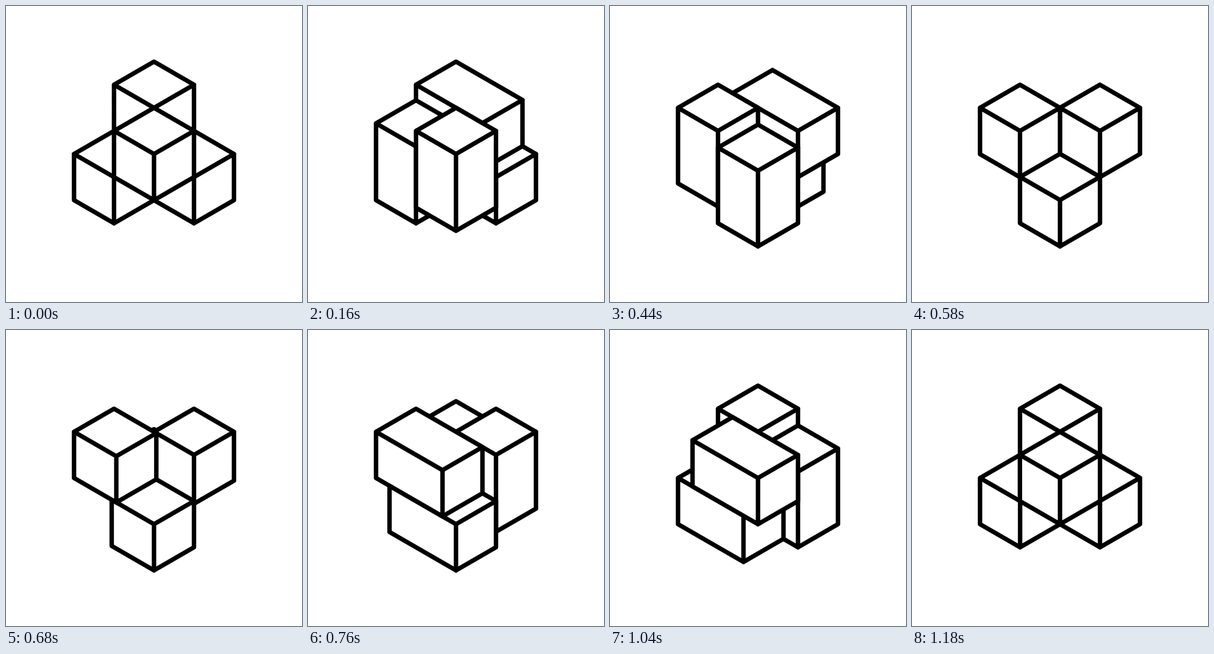
Write an HTML page without scripts that moves like this. It is 500 by 500 pixels and loops after 1.2 s.

```html
<!DOCTYPE html>
<html lang="en">
<head>
<meta charset="utf-8">
<title>Sliding boxes</title>
<style>
  html, body { margin: 0; width: 100%; height: 100%; overflow: hidden; background: #fff; }
  svg { display: block; width: 500px; height: 500px; }

  path {
    fill: #fff;
    stroke: #000;
    stroke-width: 7.5px;
    stroke-linejoin: round;
    vector-effect: non-scaling-stroke;
    animation: 600ms cubic-bezier(.8, 0, .2, 1) infinite;
  }

  /* Each box stretches one unit along its axis, then pulls in its tail. */
  .forward { animation-name: forward; }
  .back { animation-name: back; }
  .up { animation-name: up; }
  .down { animation-name: down; }

  @keyframes forward {
    0%   { d: path("M0 0 l-1 -1 l1 -1 l1 1 z l-1 -1 v2 l1 1 z l1 -1 v2 l-1 1 z"); }
    50%  { d: path("M1 1 l-2 -2 l1 -1 l2 2 z l-2 -2 v2 l2 2 z l1 -1 v2 l-1 1 z"); }
    100% { d: path("M1 1 l-1 -1 l1 -1 l1 1 z l-1 -1 v2 l1 1 z l1 -1 v2 l-1 1 z"); }
  }
  @keyframes back {
    0%   { d: path("M0 0 l-1 -1 l1 -1 l1 1 z l-1 -1 v2 l1 1 z l1 -1 v2 l-1 1 z"); }
    50%  { d: path("M0 0 l-2 -2 l1 -1 l2 2 z l-2 -2 v2 l2 2 z l1 -1 v2 l-1 1 z"); }
    100% { d: path("M-1 -1 l-1 -1 l1 -1 l1 1 z l-1 -1 v2 l1 1 z l1 -1 v2 l-1 1 z"); }
  }
  @keyframes up {
    0%   { d: path("M0 0 l-1 -1 l1 -1 l1 1 z l-1 -1 v2 l1 1 z l1 -1 v2 l-1 1 z"); }
    50%  { d: path("M0 -2 l-1 -1 l1 -1 l1 1 z l-1 -1 v4 l1 1 z l1 -1 v4 l-1 1 z"); }
    100% { d: path("M0 -2 l-1 -1 l1 -1 l1 1 z l-1 -1 v2 l1 1 z l1 -1 v2 l-1 1 z"); }
  }
  @keyframes down {
    0%   { d: path("M0 0 l-1 -1 l1 -1 l1 1 z l-1 -1 v2 l1 1 z l1 -1 v2 l-1 1 z"); }
    50%  { d: path("M0 0 l-1 -1 l1 -1 l1 1 z l-1 -1 v4 l1 1 z l1 -1 v4 l-1 1 z"); }
    100% { d: path("M0 2 l-1 -1 l1 -1 l1 1 z l-1 -1 v2 l1 1 z l1 -1 v2 l-1 1 z"); }
  }

  /* The two halves of the loop take turns. */
  .half { animation: turn 1200ms step-end infinite; }
  .second { animation-delay: -600ms; }
  @keyframes turn {
    0%   { visibility: visible; }
    50%, 100% { visibility: hidden; }
  }
</style>
</head>
<body>
<svg viewBox="0 0 500 500">
  <!-- One unit is half a cube's width across and a quarter of its height down. -->
  <g transform="translate(250 250) scale(67.55 39)">
    <g class="half">
      <path class="back" transform="translate(1 1)"/>
      <path class="forward" transform="translate(0 -2)"/>
      <path class="up" transform="translate(-1 1)"/>
      <path class="down"/>
    </g>
    <g class="half second">
      <path class="up"/>
      <path class="down" transform="translate(1 -1)"/>
      <path class="back" transform="translate(0 2)"/>
      <path class="forward" transform="translate(-1 -1)"/>
    </g>
  </g>
</svg>
</body>
</html>
```
